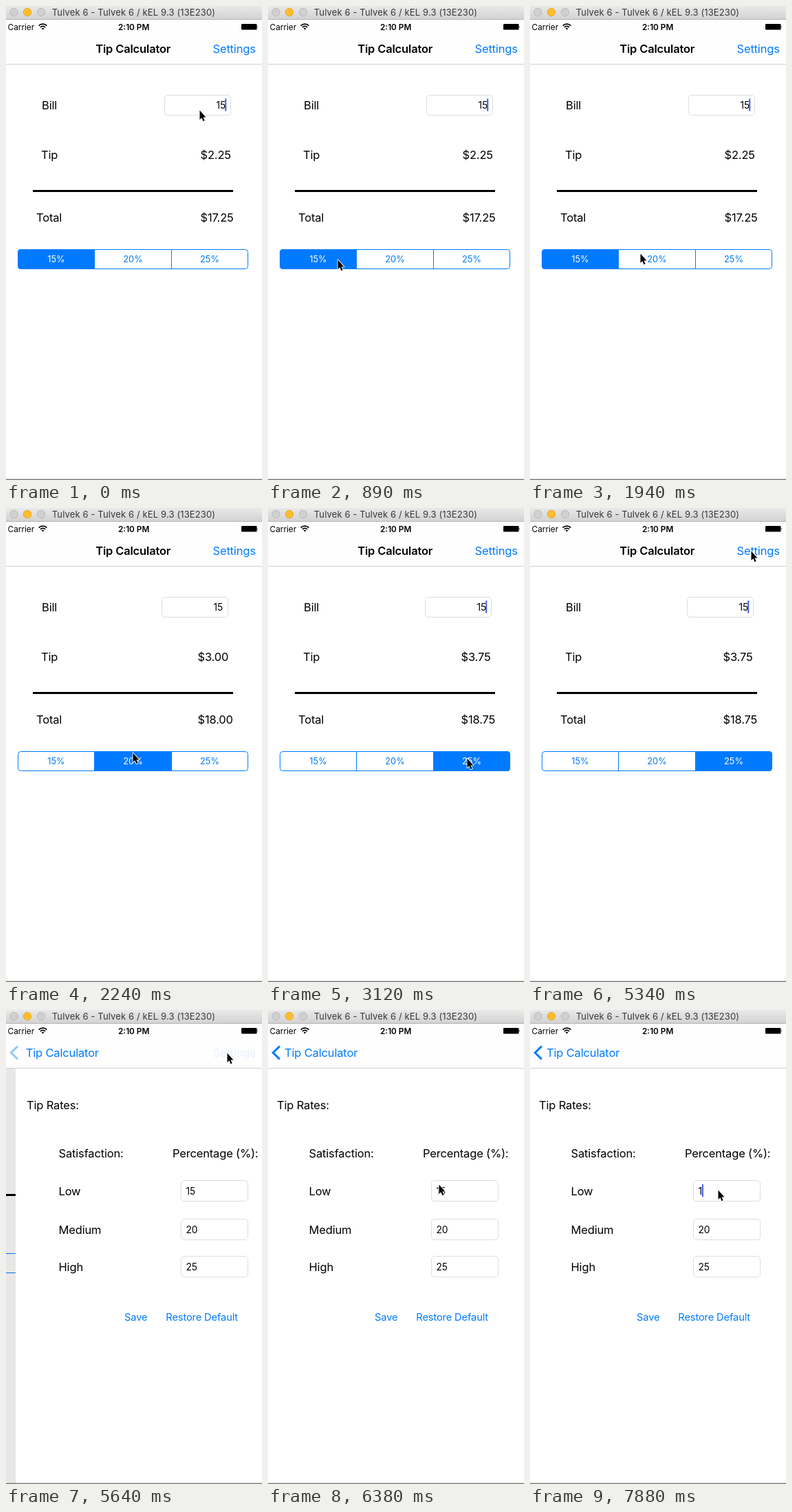
Write an HTML page that moves like this. It is 372 px wide and 688 px high and loops after 8000 ms.

```html
<!DOCTYPE html>
<html lang="en">
<head>
<meta charset="utf-8">
<title>Tip Calculator</title>
<style>
  html, body { margin: 0; width: 100%; height: 100%; overflow: hidden; background: #fff; }
  svg { display: block; }
  text { font: 16.5px Inter, Roboto, sans-serif; letter-spacing: -.01em; white-space: pre; }
  .bold { font-weight: 600; }
  .field { font-size: 13.8px; }
  .seg { font-size: 12.8px; letter-spacing: 0; }
  .button { font-size: 14.7px; }
  .status { font-size: 11.8px; letter-spacing: 0; }
  .window { font-size: 13px; letter-spacing: .01em; fill: #383838; }
  .blue { fill: #007aff; }
  .box { fill: #fff; stroke: #dedede; }
  .mid { text-anchor: middle; }
  .caret { fill: #4259ec; }
</style>
</head>
<body>
<svg id="stage" width="372" height="688" viewBox="0 0 372 688">
  <defs>
    <linearGradient id="bar" x2="0" y2="1">
      <stop stop-color="#e9e9e9"/><stop offset="1" stop-color="#d2d2d2"/>
    </linearGradient>
    <clipPath id="rounded"><rect x="17" y="353" width="335" height="29" rx="4.5"/></clipPath>
  </defs>
  <rect width="372" height="688" fill="#fff"/>
  <g id="main"></g>
  <rect id="dim" y="85" width="372" height="603"/>
  <g id="rates"></g>
  <g id="nav">
    <rect y="20" width="372" height="64" fill="#fefefe"/>
    <rect y="84" width="372" height="1" fill="#cfcfcf"/>
    <path id="chevron" d="M17 52.7L7.3 62l9.7 9.3" fill="none" stroke="#007aff" stroke-width="3"/>
  </g>
  <g id="status">
    <path d="M47.6 28.6a8.4 8.4 0 0 1 11.8 0M49.9 31a5 5 0 0 1 7.2 0"
      fill="none" stroke="#000" stroke-width="1.7"/>
    <path d="M51.6 32.6a2.7 2.7 0 0 1 3.8 0l-1.9 2z"/>
    <rect x="342" y="26" width="22.5" height="8.5" rx="1.3"/>
    <path d="M364.8 28.6q1.8 1.6 0 3.3z"/>
  </g>
  <g id="window">
    <rect width="372" height="19.5" fill="url(#bar)"/>
    <rect y="19" width="372" height="1" fill="#b4b4b4"/>
    <g fill="#d0d0d0" stroke="#b9b9b9">
      <circle cx="11.5" cy="9" r="5.7"/>
      <circle cx="31" cy="9" r="5.7" fill="#fdbd2e" stroke="#e9a92a"/>
      <circle cx="51" cy="9" r="5.7"/>
    </g>
    <rect y="686.6" width="372" height="1.4" fill="#777"/>
  </g>
  <path id="cursor" d="M.5-.5V13L3.4 10.2 5.5 15.2 7.6 14.3 5.5 9.4H9.4Z"
    stroke="#fff" stroke-width="1.8" paint-order="stroke" stroke-linejoin="round"/>
</svg>
<script>
const LOOP = 8000, STEP = LOOP / 54, WIDTH = 375;
const $ = id => document.getElementById(id);

function set(el, attrs) {
  for (const key in attrs) el.setAttribute(key, attrs[key]);
}
function add(parent, tag, attrs, content = '') {
  const el = document.createElementNS('http://www.w3.org/2000/svg', tag);
  set(el, attrs);
  el.textContent = content;
  return parent.appendChild(el);
}
const label = (parent, x, y, content, cls = '') =>
  add(parent, 'text', { x, y, class: cls }, content);
const box = (parent, x, y, width, height) =>
  add(parent, 'rect', { x, y, width, height, rx: 4.5, class: 'box' });
const caret = (parent, y) =>
  add(parent, 'rect', { y, x: 35.2, width: 2, height: 18, class: 'caret' });
const move = (el, x, y = 0) => el.setAttribute('transform', `translate(${x} ${y})`);
const fade = (el, opacity) => el.setAttribute('opacity', opacity);
const clamp = v => Math.min(1, Math.max(0, v));
const smooth = v => v * v * (3 - 2 * v);

// Calculator page
const main = $('main');
label(main, 52, 150, 'Bill');
label(main, 51, 222, 'Tip');
label(main, 44, 312.5, 'Total');
add(main, 'rect', { x: 39, y: 267, width: 291, height: 3 });
const values = add(main, 'g', {});
box(values, -52.5, 129.5, 96, 29);
label(values, 22.5, 148.7, '15', 'field');
const billCaret = caret(values, 134.5);
const tip = label(values, -.5, 222, '');
const total = label(values, -.5, 312.5, '');

const edge = i => Math.round(17 + i * 335 / 3);
add(main, 'rect', { x: 17.5, y: 353.5, width: 334, height: 28, rx: 4, fill: 'none', stroke: '#007aff' });
const fill = add(add(main, 'g', { 'clip-path': 'url(#rounded)' }), 'rect',
  { y: 353, width: 112, height: 29, class: 'blue' });
const segments = ['15%', '20%', '25%'].map((s, i) => {
  if (i) add(main, 'rect', { x: edge(i) - (i === 1), y: 353, width: 1, height: 28, class: 'blue' });
  return label(main, (edge(i) + edge(i + 1)) / 2, 372.2, s, 'seg mid');
});

// Settings page
const rates = $('rates');
add(rates, 'rect', { x: -3, y: 85, width: WIDTH, height: 602, fill: '#fff' });
label(rates, 13, 144, 'Tip Rates:');
label(rates, 59.5, 214, 'Satisfaction:');
label(rates, 225, 214, 'Percentage (%):');
const inputs = [['Low', 15, 247.5], ['Medium', 20, 303.5], ['High', 25, 357.5]].map(([name, n, y]) => {
  label(rates, 59.5, y + 21, name);
  box(rates, 237.5, y, 97, 30);
  return label(rates, 244.6, y + 20, n, 'field');
});
const rateCaret = caret(rates, 253);
label(rates, 155, 451.3, 'Save', 'button blue');
label(rates, 215.3, 451.3, 'Restore Default', 'button blue');

// Bars
const nav = $('nav');
const heading = label(nav, 184.7, 68, 'Tip Calculator', 'bold mid');
const back = label(nav, 24, 68, 'Tip Calculator', 'blue');
const settings = label(nav, 300.5, 68, 'Settings', 'blue');
label($('status'), 2.6, 34.5, 'Carrier', 'status');
label($('status'), 185.7, 34.5, '2:10 PM', 'status bold mid');
label($('window'), 185.5, 14, 'Tulvek 6 - Tulvek 6 / kEL 9.3 (13E230)', 'window mid');

// Pointer trips: leave, arrive, x, y
const trips = [
  [50, 880, 101, 369], [1400, 2220, 184, 356], [2222, 2640, 289, 364], [4300, 4440, 300, 106],
  [4445, 5180, 321, 63], [6080, 6365, 248, 254], [6370, 6660, 273, 262]
];
const pointer = t => trips.reduce(([x, y], [leave, arrive, toX, toY]) => {
  const k = smooth(clamp((t - leave) / (arrive - leave)));
  return [x + (toX - x) * k, y + (toY - y) * k];
}, [281, 152]);

const blink = (t, peak) => clamp(4 * Math.cos((t - peak) / 1040 * 2 * Math.PI) - .3);

// Share of the page push still to go: a critically damped spring
function remaining(t) {
  const k = Math.max(0, t - 5363) * .01826;
  return (1 + k) * Math.exp(-k);
}

function draw(t) {
  const picked = (t > 2050) + (t > 3100);
  const amount = 15 * (15 + 5 * picked) / 100;
  tip.textContent = '$' + amount.toFixed(2);
  total.textContent = '$' + (15 + amount).toFixed(2);
  move(values, Math.round(330.8 - total.getComputedTextLength()));
  fade(billCaret, picked === 1 ? 0 : blink(t, 4200));
  fill.setAttribute('x', edge(picked));
  segments.forEach((s, i) => s.setAttribute('fill', i === picked ? '#fff' : '#007aff'));

  const p = remaining(t), done = 1 - p;
  move(main, -.3 * WIDTH * done);
  move(rates, Math.round(WIDTH * p));
  fade($('dim'), .1 * done);
  move(heading, -105 * done);
  move(back, 105 * p);
  const swap = clamp(2 * p - .2);
  fade(heading, swap);
  fade(back, 1 - swap);
  fade(settings, clamp(2 * p));
  fade($('chevron'), clamp(1 - 13 * p));

  inputs[0].textContent = t > 7840 ? '1' : '15';
  rateCaret.setAttribute('x', 244.4 + inputs[0].getComputedTextLength());
  fade(rateCaret, t > 6600 ? blink(t, 6720) : 0);
  move($('cursor'), ...pointer(t).map(Math.round));
}

const start = performance.now();
function tick() {
  const t = (performance.now() - start) % LOOP;
  draw(Math.floor(t / STEP) * STEP);
  requestAnimationFrame(tick);
}
tick();
</script>
</body>
</html>
```
